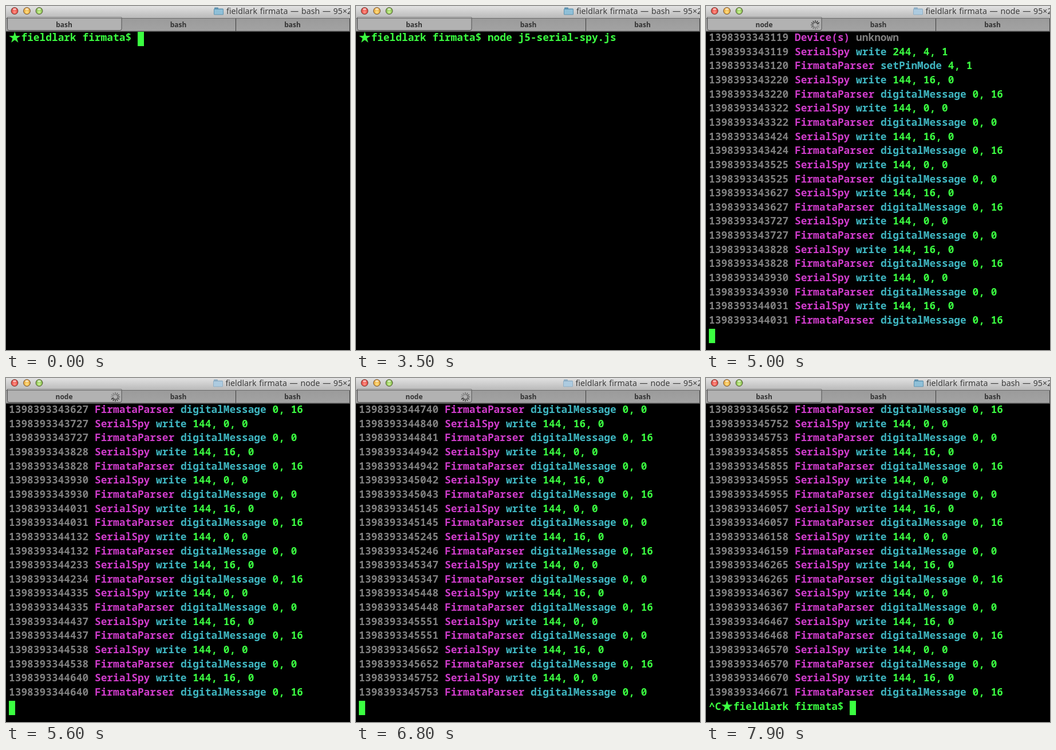
An HTML page with a canvas that plays this animation: 601 px wide and 600 px high, repeating every 9900 ms.

```html
<!DOCTYPE html>
<html lang="en">
<head>
<meta charset="utf-8">
<title>Terminal</title>
<style>
html, body { margin: 0; width: 100%; height: 100%; overflow: hidden; background: #000; }
canvas { display: block; }
</style>
</head>
<body>
<canvas id="stage" width="601" height="600"></canvas>
<script>
const ctx = document.getElementById('stage').getContext('2d');
const LOOP = 9900;
const CELL = 10.71, PITCH = 24.65, LEFT = 5, TOP = 45, ROWS = 22;
const GREY = '#808080', PINK = '#d03ccb', CYAN = '#3fb6c1', GREEN = '#3bff41';
const MONO = '17.85px "Noto Sans Mono", monospace';
const SANS = '"Noto Sans", "Open Sans", sans-serif';
const HOST = 'fieldlark';
const COMMAND = 'node j5-serial-spy.js ';

// [time, typed characters]; the jumps are tab completions
const KEYS = [[500, 1], [600, 2], [700, 3], [800, 4], [1000, 5], [1900, 6],
  [2200, 15], [2300, 16], [2400, 17], [2700, 18], [2800, 22]];
const START = 3900, STOP = 7800, EXIT = 7900;
const LAG = 960; // stage time minus log stamp

// Log lines: stamp in ms and coloured words
const log = [];
function add(stamp, name, action, args = '') {
  log.push({ stamp, words: [[1398393340000 + stamp, GREY], [name, PINK],
    [action, action === 'unknown' ? GREY : CYAN], [args, GREEN]] });
}
function call(stamp, bytes, action, args, parsed = stamp) {
  add(stamp, 'SerialSpy', 'write', bytes);
  add(parsed, 'FirmataParser', action, args);
}

for (let pin = 0; pin < 16; pin++) {
  const stamp = pin < 15 ? 3115 : 3116;
  call(stamp, `${208 + pin}, 1`, 'reportDigital', `${pin}, 1`);
  call(stamp, `${192 + pin}, 1`, 'reportAnalog', `${pin}, 1`);
}
call(3117, '240, 107, 247', 'capabilityQuery');
call(3117, '240, 105, 247', 'analogMappingQuery');
log.push({ stamp: 3117, words: [['ready to robot!', GREEN]] });
add(3119, 'Device(s)', 'unknown');
call(3119, '244, 4, 1', 'setPinMode', '4, 1', 3120);

const BLINKS = [3220, 3322, 3424, 3525, 3627, 3727, 3828, 3930, 4031, 4132, 4233, 4335,
  4437, 4538, 4640, 4740, 4840, 4942, 5042, 5145, 5245, 5347, 5448, 5551, 5652, 5752,
  5855, 5955, 6057, 6158, 6265, 6367, 6467, 6570, 6670];
const LATE = [4233, 4840, 5042, 5245, 5752, 6158, 6467, 6670]; // parsed 1 ms later
BLINKS.forEach((stamp, i) => {
  const value = i % 2 ? 0 : 16;
  call(stamp, `144, ${value}, 0`, 'digitalMessage', `0, ${value}`,
    stamp + LATE.includes(stamp));
});

function rect(x, y, w, h, color) {
  ctx.fillStyle = color;
  ctx.fillRect(x, y, w, h);
}

function text(str, x, y, color, font, align = 'left') {
  ctx.font = font;
  ctx.textAlign = align;
  ctx.fillStyle = color;
  ctx.fillText(str, x, y);
}

function fade(y0, y1, from, to) {
  const g = ctx.createLinearGradient(0, y0, 0, y1);
  g.addColorStop(0, from);
  g.addColorStop(1, to);
  return g;
}

const colX = col => LEFT + col * CELL;
const rowY = row => TOP + row * PITCH;

function put(str, col, row, color) {
  const weight = color === PINK ? 700 : 600;
  text(str, colX(col), rowY(row) + 16, color, `${weight} ${MONO}`);
}

function cursor(col, row) {
  rect(Math.round(colX(col)), Math.round(rowY(row)), 11, 25, GREEN);
}

function star(col, row) {
  const x = colX(col) + 10.3, y = rowY(row) + 10.3;
  ctx.beginPath();
  for (let i = 0; i < 10; i++) {
    const r = i % 2 ? 4 : 10.5, a = i * Math.PI / 5;
    ctx.lineTo(x + r * Math.sin(a), y - r * Math.cos(a));
  }
  ctx.fillStyle = GREEN;
  ctx.fill();
}

// Draws the prompt and returns the column after it
function prompt(col, row) {
  const str = HOST + ' firmata$ ';
  star(col, row);
  put(str, col + 2, row, GREEN);
  return col + 2 + str.length;
}

function words(list, row) {
  let col = 0;
  for (const [word, color] of list) {
    put(word, col, row, color);
    col += String(word).length + 1;
  }
}

function light(x, color, glow) {
  const g = ctx.createRadialGradient(x, 11, 1, x, 8.5, 6.5);
  g.addColorStop(0, glow);
  g.addColorStop(1, color);
  ctx.beginPath();
  ctx.arc(x, 8.5, 6, 0, 7);
  ctx.fillStyle = g;
  ctx.fill();
  ctx.strokeStyle = 'rgba(50,30,20,.6)';
  ctx.lineWidth = 1;
  ctx.stroke();
  ctx.beginPath();
  ctx.ellipse(x, 5.4, 3, 1.7, 0, 0, 7);
  ctx.fillStyle = 'rgba(255,255,255,.6)';
  ctx.fill();
}

function folder(x, color, edge) {
  ctx.beginPath();
  ctx.roundRect(x + 1, 2.5, 7, 5, 1);
  ctx.roundRect(x, 4.5, 17, 11, 1.5);
  ctx.fillStyle = edge;
  ctx.fill();
  rect(x + 1, 6, 15, 8.5, color);
}

function spinner(t) {
  const head = Math.floor(t / 100) % 12;
  ctx.lineWidth = 1.5;
  ctx.lineCap = 'round';
  for (let i = 0; i < 12; i++) {
    const a = i * Math.PI / 6, c = Math.sin(a), s = -Math.cos(a);
    const age = (head - i + 12) % 12;
    ctx.strokeStyle = `rgba(35,35,35,${0.95 - age * 0.065})`;
    ctx.beginPath();
    ctx.moveTo(191 + 4 * c, 33 + 4 * s);
    ctx.lineTo(191 + 7.5 * c, 33 + 7.5 * s);
    ctx.stroke();
  }
}

function chrome(t) {
  const busy = t >= START && t < EXIT;
  const job = busy ? 'node' : 'bash';
  rect(0, 0, 601, 21, fade(0, 21, '#e2e2e2', '#b9b9b9'));
  light(15, '#d8322f', '#ff8d80');
  light(36.5, '#dd962c', '#ffdc7c');
  light(58, '#6ca83c', '#c8f08c');
  folder(busy ? 362 : 363, busy ? '#adcbe0' : '#8fc0d8', busy ? '#8fafc6' : '#5f93b0');
  ctx.wordSpacing = '1px';
  text(`${HOST} firmata — ${job} — 95×24`, busy ? 383.5 : 385, 14, '#3c3c3c', `14.2px ${SANS}`);
  ctx.wordSpacing = '0px';

  rect(0, 21, 601, 24, '#4a4a4a');
  rect(0, 22, 601, 21.5, fade(22, 44, '#9b9b9b', '#a3a3a3'));
  ctx.beginPath();
  ctx.roundRect(2.5, 20, 199.5, 22.5, [0, 0, 3, 3]);
  ctx.fillStyle = '#b2b2b2';
  ctx.fill();
  ctx.strokeStyle = '#505050';
  ctx.lineWidth = 1;
  ctx.stroke();
  rect(3, 20, 198.5, 1, '#b9b9b9');
  rect(0, 21, 601, 1, '#6a6a6a');
  rect(401, 22, 1, 22, '#3c3c3c');
  rect(600, 22, 1, 22, '#3c3c3c');
  [job, 'bash', 'bash'].forEach((name, i) =>
    text(name, 101.5 + i * 199.5, 37, '#333', `700 12px ${SANS}`, 'center'));
  if (busy && t >= 4800) spinner(t);
}

function screen(t) {
  const typed = KEYS.reduce((n, [at, count]) => t >= at ? count : n, 0);
  const lines = t < START ? [] : log.filter(line => line.stamp + LAG <= t);
  const scroll = Math.max(0, lines.length + 2 - ROWS);
  if (!scroll) {
    const col = prompt(0, 0);
    put(COMMAND.slice(0, typed), col, 0, GREEN);
    const blink = (t >= 1700 && t < 1900) || t >= 3500;
    if (!blink) cursor(col + typed, 0);
  }
  lines.forEach((line, i) => {
    const row = i + 1 - scroll;
    if (row >= 0) words(line.words, row);
  });
  if (t < START) return;
  const last = lines.length + 1 - scroll;
  if (t < STOP) {
    cursor(0, last);
  } else {
    put('^C', 0, last, GREEN);
    cursor(prompt(2, last), last);
  }
}

function draw(now) {
  const t = Math.floor(now % LOOP / 100) * 100;
  rect(0, 0, 601, 600, '#000');
  screen(t);
  chrome(t);
  requestAnimationFrame(draw);
}
requestAnimationFrame(draw);
</script>
</body>
</html>
```
